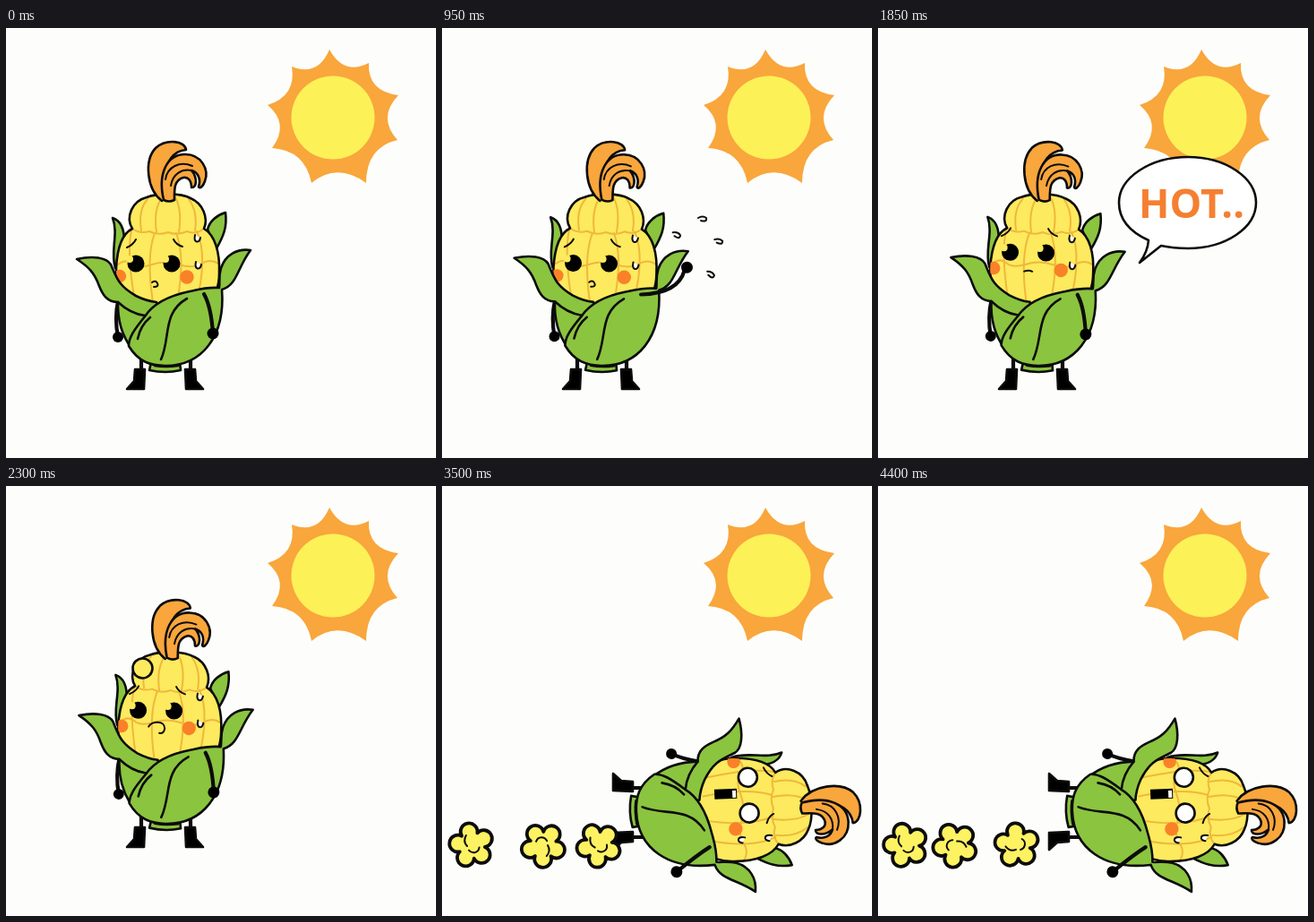
An HTML page for the animation above (4.45 s loop, 480 by 480 pixels).

```html
<!DOCTYPE html>
<html lang="en">
<head>
<meta charset="utf-8">
<title>Hot corn</title>
<style>
  html, body { margin: 0; width: 100%; height: 100%; overflow: hidden; background: #fdfefb; }
  svg { display: block; width: 100vw; height: 100vh; }
  .ink { stroke: #0c0c0c; stroke-width: 2.6; stroke-linejoin: round; stroke-linecap: round; }
  .thin { stroke-width: 2; }
  .none { fill: none; }
  .leaf { fill: #8bc43f; }
  .corn { fill: #fdea5e; }
  .hair { fill: #f9a63c; }
  .white { fill: #fff; }
  .limb { stroke-width: 4.2; fill: none; }
  .seam { stroke: #efb83c; stroke-width: 2; fill: none; stroke-linecap: round; }
  .cheek { fill: #fa8128; }
  text { font: 700 45px "Open Sans", "Noto Sans", sans-serif; font-stretch: 75%; fill: #f57f31; text-anchor: middle; }
</style>
</head>
<body>
<svg viewBox="0 0 480 480">
  <defs>
    <path id="cob" d="M141 224C133 211 141 193 157 189C170 184 195 184 206 190C220 196 226 212 221 224C233 231 239 250 238 274C238 300 220 330 180 330S122 294 123 268C124 248 129 230 141 224Z"/>
    <clipPath id="inCob"><use href="#cob"/></clipPath>
    <g id="popcorn" class="ink">
      <path id="puff" fill="#fdf262" style="stroke-width:3.8"/>
      <path class="none thin" d="M4 -8C10 -6 10 1 5 4M-12 4Q-6 9 0 5"/>
    </g>
    <path id="drop" class="ink none thin" d="M-5 -1Q0 -4 4 -1Q5 4 -2 2"/>
    <path id="burst" class="ink white thin" d="M-14 17Q-18 7 -27 -2Q-20 2 -13 1Q-14 -9 -18 -19Q-12 -9 -5 -4Q2 -11 6 -22Q7 -12 12 -5Q21 -9 27 -18Q23 -4 24 11Q4 7 -14 17Z"/>
  </defs>

  <path id="sun" class="hair"/>
  <circle cx="365" cy="100" r="46.5" fill="#fdf158"/>

  <g id="figure">
    <g class="ink">
      <path class="limb" d="M151 366V386M206 366V386"/>
      <path d="M144 381H155L154 403H135L143 394ZM200 381H211L212 394L220 403H201Z"/>
    </g>
    <g id="body">
      <path class="ink leaf" d="M119 212C128 215 132 224 132 238L122 268C116 250 126 230 119 212ZM245 206C235 209 227 216 225 225L235 246C243 232 247 222 245 206Z"/>
      <path id="armL" class="ink limb"/>
      <circle id="handL" r="6"/>
      <g id="ear">
        <use href="#cob" class="corn"/>
        <path class="seam" d="M141 224Q149 230 160 227Q170 232 181 228Q191 232 202 227Q212 231 221 224M125 264Q134 257 141 263T163 264T193 264T218 263T237 263"/>
        <path class="seam" d="M158 191C150 200 149 214 151 226M174 189C166 201 166 215 168 228M189 189C195 200 195 215 193 228M204 191C212 202 213 213 211 226M140 226C136 245 138 270 143 300M166 229C158 250 160 280 164 306M190 229C198 250 196 280 191 306M213 227C222 246 220 275 214 300"/>
        <use href="#cob" class="ink none"/>
        <circle id="bump" class="ink corn" cx="149" cy="204"/>
        <path class="ink white thin" d="M211 231C209 240 216 241 217 234M212 261C210 270 217 271 218 264"/>
      </g>
      <path class="ink hair" d="M174 193C157 180 154 148 167 134C179 123 200 126 201 136C188 137 177 148 177 171"/>
      <path class="ink hair" d="M176 192C169 162 180 141 200 141C218 141 227 158 222 171C220 177 216 180 215 177C218 168 214 161 207 159C214 167 213 179 207 178C207 170 203 166 198 167C187 170 188 181 188 192Q182 195 176 192Z"/>
      <path class="ink none thin" d="M178 169C180 155 194 148 208 154M184 176C186 163 196 157 207 159"/>

      <g clip-path="url(#inCob)"><g id="cheeks" class="cheek"><circle cx="127" cy="277" r="7.2"/><circle cx="202" cy="278" r="7.7"/></g></g>
      <g id="face">
        <g id="eyes">
          <circle cx="145" cy="263" r="9.5"/><circle cx="185" cy="263" r="9.5"/>
          <circle class="corn" cx="138" cy="258" r="4"/><circle class="corn" cx="178" cy="258" r="4"/>
        </g>
        <g id="wide" class="ink white">
          <circle cx="145" cy="263" r="10.5"/><circle cx="185" cy="263" r="10.5"/>
        </g>
        <path class="ink none thin" d="M135 245Q142 242 145 236M187 236Q190 242 197 244"/>
        <path id="mouth" class="ink none thin"/>
        <g id="gape"><path d="M157 276H168V301H157Z"/><path class="white" d="M159 277H167V281H159Z"/></g>
      </g>

      <path class="ink leaf" d="M162 373L160 382Q178 386 195 382L194 373Z"/>
      <path class="ink leaf" d="M79 258C97 254 112 256 117 264C124 280 126 288 145 299Q157 305 168 306L180 376C148 380 124 346 125 306C113 306 108 298 104 288C99 274 93 267 79 258Z"/>
      <path class="ink leaf" d="M273 248C258 246 245 253 240 268C237 278 239 284 238 290C224 289 214 292 205 294C181 299 164 308 155 322C142 338 137 346 137 355C148 373 162 377 178 377C219 377 245 344 241 292C258 287 258 268 273 248Z"/>
      <path class="ink none" d="M202 302C174 318 184 346 173 370M125 306Q139 319 155 321M147 347Q150 332 161 323"/>
      <path class="ink none" d="M166 377Q178 379 192 377"/>
      <path id="armR" class="ink limb"/>
      <circle id="handR" r="6.5"/>
    </g>
  </g>

  <g id="drops"></g>
  <g id="bursts"><use href="#burst" x="287" y="257"/><use href="#burst" x="384" y="266"/></g>
  <g id="pops"></g>
  <g id="bubble">
    <path class="ink white" d="M302 237C280 227 269 212 269 195C269 167 304 144 346 144S422 167 422 195S388 246 346 246Q330 246 316 243L292 262Q301 250 302 237Z"/>
    <text x="350" y="212">HOT..</text>
  </g>
</svg>
<script>
const LOOP = 4450, STEP = 50;
const $ = id => document.getElementById(id);
const set = (id, attrs) => { for (const k in attrs) $(id).setAttribute(k, attrs[k]); };
const show = (id, on) => set(id, { visibility: on ? 'visible' : 'hidden' });
const part = (t, a, b) => Math.min(1, Math.max(0, (t - a) / (b - a)));
const mix = (a, b, p) => a + (b - a) * p;
const easeOut = p => 1 - (1 - p) ** 2;

const tips = [[361,24],[405,39],[438,75],[437,125],[402,173],[341,173],[297,134],[292,86],[319,43]];
set('sun', { d: tips.map(([x, y], i) => {
  const [u, v] = tips[(i + 1) % tips.length];
  return `${i ? '' : `M${x} ${y}`}Q${mix((x + u) / 2, 365, .32)} ${mix((y + v) / 2, 100, .32)} ${u} ${v}`;
}).join('') + 'Z' });

// Five round lobes.
const notch = i => `${15 * Math.cos(i * .4 * Math.PI)} ${15 * Math.sin(i * .4 * Math.PI)}`;
set('puff', { d: `M${notch(0)}` + [1, 2, 3, 4, 5].map(i => `A9.4 9.4 0 1 1 ${notch(i)}`).join('') + 'Z' });

// Drops: x, y, angle. Popcorn: point in flight, landing time, landing x, resting x.
const drops = [[291,213,0],[262,231,20],[309,238,10],[300,275,30]];
const pops = [[117,266,3150,56,33,31],[251,106,3450,117,113,86],[366,167,3450,184,175,155]];
const addUses = (id, ref, n) => $(id).innerHTML = `<use href="#${ref}"/>`.repeat(n);
addUses('drops', 'drop', drops.length);
addUses('pops', 'popcorn', pops.length);

function popAt(t, [x, y, land, hit, mid, rest]) {
  if (t < 2950) {
    const p = part(t, 2700, 2950);
    return [mix(330, x, p), mix(240, y, easeOut(p))];
  }
  if (t < land) {
    const p = part(t, 2950, land);
    return [mix(x, hit, p), mix(y, 401, p * p)];
  }
  return t < 3500
    ? [mix(hit, mid, easeOut(part(t, land, 3500))), 401 - 10 * Math.sin(Math.PI * part(t, land, 3500))]
    : [mix(mid, rest, easeOut(part(t, 3500, 4300))), 401];
}

function arms(t, fallen, waving) {
  const swing = waving ? 9 * (Math.cos((t - 950) / 400 * 2 * Math.PI) - 1) : 0;
  const left = fallen ? [115, 335] : [125, 345];
  const right = waving ? [272, 266] : fallen ? [247, 335] : [231, 341];
  const turn = `rotate(${-swing} 221 297)`;
  set('armL', { d: `M125 305Q121 324 ${left}` });
  set('handL', { cx: left[0], cy: left[1] });
  set('armR', { d: `M221 297${waving ? 'C244 296 264 289 269 270' : `Q229 311 ${right}`}`, transform: turn });
  set('handR', { cx: right[0], cy: right[1], transform: turn });
}

function draw(t) {
  const drop = part(t, 2600, 2850), fallen = t >= 2600, waving = t >= 550 && t < 1200;
  const lean = mix(1.1 * part(t, 0, 1450), -2.5, drop);
  const jolt = drop === 1 ? 3 * (1 - part(t, 2950, 3100)) : 0;
  set('figure', { transform: `translate(${jolt} 0) rotate(${90 * drop * drop} 204 390)` });
  set('body', { transform: `rotate(${lean} 180 385)` });
  set('ear', { transform: `translate(0 ${-4 * drop})` });
  arms(t, fallen, waving);

  const lift = part(t, 1150, 1300);
  set('face', { transform: `translate(0 ${-12 * lift})` });
  set('cheeks', { transform: `translate(0 ${-8 * lift - 3 * drop})` });
  show('eyes', !fallen);
  show('wide', fallen);
  show('gape', fallen);
  show('mouth', !fallen);
  set('mouth', { d: t < 1200 ? 'M163 284Q167 281 169 285T165 289'
    : t < 2000 ? 'M161 284Q166 282 170 284'
    : 'M157 281C160 275 175 273 175 283Q174 289 169 288' });
  show('bump', t >= 2100 && t < 2700);
  set('bump', { r: 11 * part(t, 2100, 2300) });

  show('drops', waving && t >= 700);
  const fling = (t - 950) / 400 % 1 * 12;
  drops.forEach(([x, y, a], i) => $('drops').children[i].setAttribute('transform',
    `translate(${x + fling} ${y + fling * (y - 245) / 60}) rotate(${a})`));
  show('bubble', t >= 1250 && t < 2000);
  show('bursts', t >= 2850 && t < 3150);
  show('pops', t >= 2700);
  pops.forEach((pop, i) => {
    const [x, y] = popAt(t, pop);
    $('pops').children[i].setAttribute('transform', `translate(${x} ${y}) rotate(${x * 2.4})`);
  });
}

const start = performance.now();
(function frame() {
  const t = (performance.now() - start) % LOOP;
  draw(Math.floor(t / STEP) * STEP);
  requestAnimationFrame(frame);
})();
</script>
</body>
</html>
```
